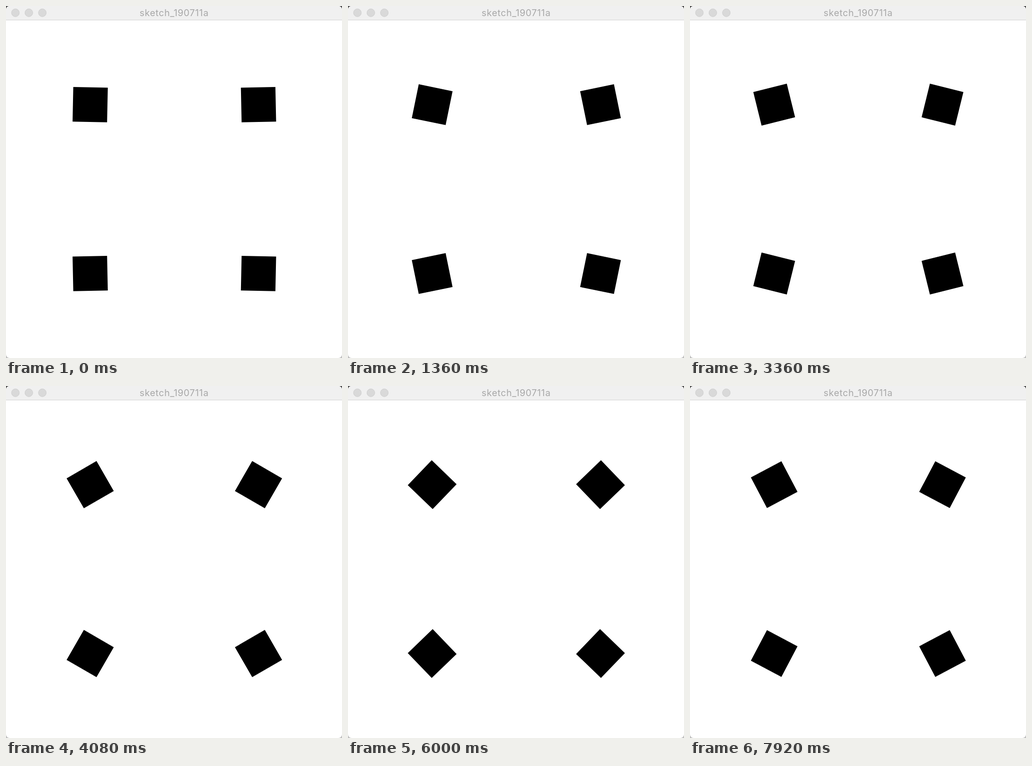
Recreate the animation shown at these times as an HTML page. Size 732 by 765 pixels, loop 8000 ms.

```html
<!DOCTYPE html>
<html lang="en">
<head>
<meta charset="utf-8">
<title>sketch_190711a</title>
<style>
  html, body { margin: 0; width: 100%; height: 100%; overflow: hidden; background: #fff; }
  svg { display: block; width: 732px; height: 765px; }
  text { font: 20px Inter, Roboto, sans-serif; letter-spacing: .7px; fill: #a8a8a8; }
</style>
</head>
<body>
<svg viewBox="0 0 732 765">
  <defs>
    <clipPath id="window"><rect width="732" height="765" rx="8"/></clipPath>
  </defs>
  <rect width="732" height="30" fill="#4a4a4a"/>
  <rect y="30" width="732" height="735" fill="#bdbdbd"/>
  <g clip-path="url(#window)">
    <rect width="732" height="765" fill="#fff"/>
    <rect width="732" height="30" fill="#f0f0f0"/>
    <rect y="30" width="732" height="1" fill="#d0d0d0"/>
  </g>
  <g fill="#d9d9d9" stroke="#cdcdcd">
    <circle cx="20.5" cy="14.7" r="8.5"/>
    <circle cx="49.8" cy="14.7" r="8.5"/>
    <circle cx="79.2" cy="14.7" r="8.5"/>
  </g>
  <text x="366.3" y="22" text-anchor="middle">sketch_190711a</text>
  <g id="squares"></g>
</svg>
<script>
const LOOP = 8000, STEP = 80, SIDE = 75.2;
// [step, degrees] of the top left square; the turn is linear in between
const TURN = [[0, 1.2], [17, -168.4], [42, -463.9], [60, -676.1],
              [75, -856.1], [91, -1013.4], [99, -1107.8]];
const layer = document.getElementById('squares');

const squares = [];
for (const [row, y] of [214.4, 581.4].entries()) {
  for (const [col, x] of [183.4, 550.1].entries()) {
    const node = document.createElementNS('http://www.w3.org/2000/svg', 'rect');
    node.setAttribute('x', -SIDE / 2);
    node.setAttribute('y', -SIDE / 2);
    node.setAttribute('width', SIDE);
    node.setAttribute('height', SIDE);
    layer.append(node);
    squares.push({ node, x, y, dir: row === col ? 1 : -1 });
  }
}

function angleAt(step) {
  const i = TURN.findIndex(([s]) => s >= step);
  if (i === 0) return TURN[0][1];
  const [s0, a0] = TURN[i - 1], [s1, a1] = TURN[i];
  return a0 + (a1 - a0) * (step - s0) / (s1 - s0);
}

function draw(ms) {
  const angle = angleAt(Math.floor(ms % LOOP / STEP));
  for (const { node, x, y, dir } of squares) {
    node.setAttribute('transform', `translate(${x} ${y}) rotate(${dir * angle})`);
  }
}

let start;
function tick(now) {
  start ??= now;
  draw(now - start);
  requestAnimationFrame(tick);
}
draw(0);
requestAnimationFrame(tick);
</script>
</body>
</html>
```
